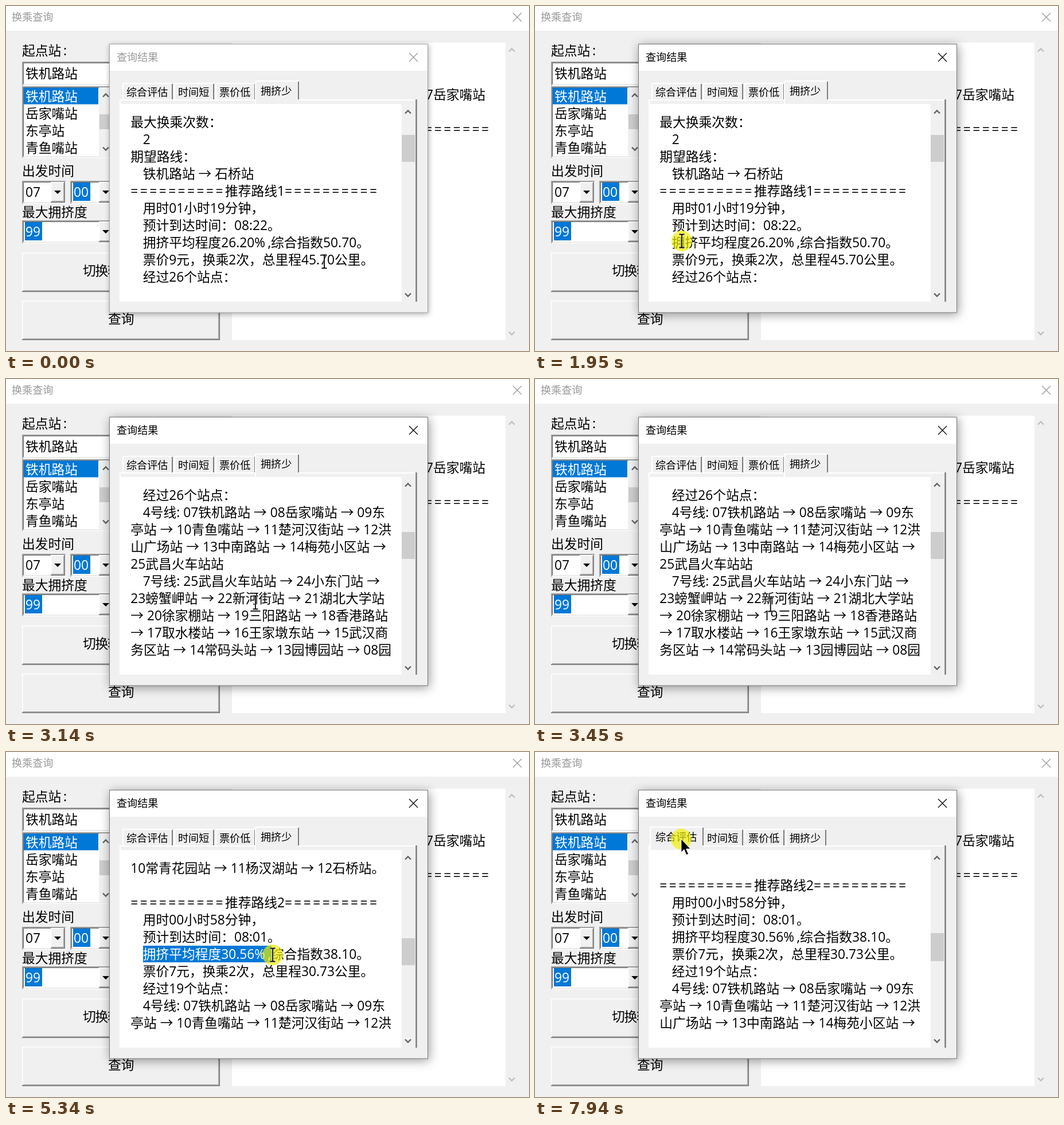
An HTML page that plays this animation: 912 px wide and 602 px high, repeating every 8000 ms.

```html
<!DOCTYPE html>
<html lang="zh-CN">
<head>
<meta charset="utf-8">
<title>换乘查询</title>
<style>
html, body { margin: 0; height: 100%; overflow: hidden; background: #f0f0f0; }
svg { display: block; width: 100vw; height: 100vh; }
text { font: 22.76px "Open Sans", "Noto Sans CJK SC", "Noto Sans CJK", sans-serif; white-space: pre; }
.small { font-size: 18.1px; }
.tight { letter-spacing: -1.2px; }
.cjk { font-family: "Noto Sans CJK SC", "Noto Sans CJK", sans-serif; }
.rule { letter-spacing: 3.45px; }
.blue { fill: #0078d7; }
.white, .white text { fill: #fff; }
.face { fill: #f0f0f0; }
.line { fill: none; stroke: currentColor; }

.title, .frame, .doc, .thumb, .tab1, .tab2, .tab4, .arrow, .beam, .halo { animation: 8s step-end infinite; }
.title { animation-name: wake; }
.frame { animation-name: shade; }
.doc { animation-name: scroll; }
.thumb { animation-name: thumb; }
.tab1 { animation-name: tab1; }
.tab2 { animation-name: tab2; }
.tab4 { animation-name: tab4; }
.arrow { animation-name: arrow; }
.beam { animation-name: beam; }
.halo { animation-name: halo; }
.cursor { animation: move 8s linear infinite; }
.pick1 { animation: pick1 8s linear infinite; }
.pick2 { animation: pick2 8s linear infinite; }

@keyframes wake { 0% { color: #999 } 22.5% { color: #000 } }
@keyframes shade {
  0% { stroke: #a2a2a2; filter: drop-shadow(1px 2px 5px #0005) }
  22.5% { stroke: #777; filter: drop-shadow(2px 3px 9px #0006) }
}
@keyframes scroll {
  0% { transform: translateY(0) }
  35% { transform: translateY(-90px) }
  37% { transform: translateY(-180px) }
  38.75% { transform: translateY(-270px) }
  46% { transform: translateY(-360px) }
  48% { transform: translateY(-450px) }
  50% { transform: translateY(-540px) }
  52.75% { transform: translateY(-630px) }
  77.1% { transform: translateY(-660px) }
}
@keyframes thumb {
  0% { transform: translateY(0); height: 47px }
  35% { transform: translateY(14px); height: 47px }
  37% { transform: translateY(28px); height: 47px }
  38.75% { transform: translateY(42px); height: 47px }
  46% { transform: translateY(57px); height: 47px }
  48% { transform: translateY(71px); height: 47px }
  50% { transform: translateY(86px); height: 47px }
  52.75% { transform: translateY(100px); height: 47px }
  77.1% { transform: translateY(91px); height: 49px }
}
@keyframes tab1 { 0% { visibility: hidden } 98.25% { visibility: visible } }
@keyframes tab2 { 0% { visibility: hidden } 77.1% { visibility: visible } 98.25% { visibility: hidden } }
@keyframes tab4 { 0% { visibility: visible } 77.1% { visibility: hidden } }
@keyframes arrow {
  0% { visibility: hidden } 73.5% { visibility: visible }
  79.5% { visibility: hidden } 95.8% { visibility: visible }
}
@keyframes beam {
  0% { visibility: visible } 73.5% { visibility: hidden }
  79.5% { visibility: visible } 95.8% { visibility: hidden }
}
@keyframes halo {
  0% { visibility: hidden } 22.5% { visibility: visible } 30.5% { visibility: hidden }
  63.5% { visibility: visible } 67.75% { visibility: hidden }
  76.8% { visibility: visible } 78.5% { visibility: hidden } 98% { visibility: visible }
}
@keyframes pick1 { 0%, 25% { width: 0 } 30%, 63.5% { width: 201px } 63.51%, 100% { width: 0 } }
@keyframes pick2 { 0%, 64% { width: 0 } 65% { width: 61px } 66.75%, 77.1% { width: 224px } 77.11%, 100% { width: 0 } }
@keyframes move {
  0%, .9% { transform: translate(555px, 446px) }
  5% { transform: translate(440px, 385px) }
  7.5% { transform: translate(322px, 358px) }
  10.9% { transform: translate(350px, 418px) }
  11.75% { transform: translate(361px, 421px) }
  16.25% { transform: translate(300px, 430px) }
  21.4% { transform: translate(277px, 411px) }
  22.5%, 24.6% { transform: translate(256px, 410px) }
  30% { transform: translate(460px, 412px) }
  32.5% { transform: translate(452px, 410px) }
  39.25% { transform: translate(435px, 390px) }
  51.75% { transform: translate(357px, 403px) }
  54% { transform: translate(392px, 399px) }
  58% { transform: translate(330px, 365px) }
  61% { transform: translate(250px, 339px) }
  63%, 64% { transform: translate(239px, 352px) }
  65% { transform: translate(300px, 353px) }
  66.75% { transform: translate(465px, 354px) }
  67.75% { transform: translate(467px, 355px) }
  71% { transform: translate(400px, 250px) }
  74.5% { transform: translate(330px, 145px) }
  77% { transform: translate(330px, 137px) }
  78.5% { transform: translate(328px, 140px) }
  80.9% { transform: translate(315px, 180px) }
  86.5% { transform: translate(322px, 225px) }
  90% { transform: translate(340px, 262px) }
  93% { transform: translate(290px, 250px) }
  95.5% { transform: translate(247px, 172px) }
  96.4% { transform: translate(251px, 156px) }
  98%, 100% { transform: translate(255px, 152px) }
}
</style>
</head>
<body>
<svg id="stage" viewBox="0 0 912 602"></svg>
<script>
const rect = (x, y, right, bottom, attrs) =>
  `<rect x="${x}" y="${y}" width="${right - x}" height="${bottom - y}" ${attrs}/>`;
const path = (d, color, width) => `<path d="${d}" class="line" style="color:${color}" stroke-width="${width}"/>`;

const markup = s => s
  .replace(/=+/g, m => `<tspan class='rule'>${m}</tspan>`)
  .replace(/→/g, "<tspan class='cjk'>→</tspan>")
  .replace('%,', "%<tspan dx='4.5'>,</tspan>");
// y is the vertical middle of the characters
const label = (x, y, s, attrs = '') => `<text x="${x}" y="${y + 8.3}" ${attrs}>${markup(s)}</text>`;
const small = (x, y, s, attrs = '') => `<text x="${x}" y="${y + 6.8}" class="small" ${attrs}>${s}</text>`;

const cross = (x, y) => `<path class="line" stroke-width="1.3" d="M${x - 7.5} ${y - 7.5}l15 15m0-15l-15 15"/>`;
const chevron = (x, y, dir, color) => path(`M${x - 5} ${y + 2.5 * dir}l5 ${-5 * dir}l5 ${5 * dir}`, color, 2.4);

const sunken = (x, y, right, bottom) =>
  rect(x, y, right, bottom, 'fill="#fff"') +
  path(`M${x + .75} ${bottom}V${y + .75}H${right}`, '#a0a0a0', 1.5) +
  path(`M${x + 2.25} ${bottom - 1.5}V${y + 2.25}H${right - 1.5}`, '#696969', 1.5) +
  path(`M${x + 1.5} ${bottom - 2}H${right - 2}V${y + 1.5}`, '#e3e3e3', 1.5);
const raised = (x, y, right, bottom) =>
  rect(x, y, right, bottom, 'class="face"') +
  path(`M${x + .75} ${bottom}V${y + .75}H${right}`, '#fff', 1.5) +
  path(`M${x} ${bottom - .75}H${right - .75}V${y}`, '#696969', 1.5) +
  path(`M${x + 1.5} ${bottom - 2.25}H${right - 2.25}V${y + 1.5}`, '#a0a0a0', 1.5);
const combo = (x, y, right, bottom, value, selected) =>
  sunken(x, y, right, bottom) +
  raised(right - 26, y + 2, right - 1, bottom - 2) +
  `<path d="M${right - 20} ${y + 17}h12l-6 6z"/>` +
  (selected ? rect(x + 5, y + 3, x + 35, y + 35, 'class="blue"') : '') +
  label(x + 6, y + 19.5, value, selected ? 'class="white"' : '');

const mainWindow = () => {
  const stations = ['铁机路站', '岳家嘴站', '东亭站', '青鱼嘴站'];
  return rect(0, 0, 912, 602, 'class="face"') + rect(0, 0, 912, 43, 'fill="#fff"') +
    small(10, 19.5, '换乘查询', 'fill="#999"') + `<g color="#999">${cross(891.5, 19.5)}</g>` +
    rect(394, 64, 871, 583, 'fill="#fff"') +
    chevron(882, 77, 1, '#bfbfbf') + chevron(882, 571, -1, '#bfbfbf') +
    label(732, 155, '7岳家嘴站') + label(681, 215, '==========') +
    label(28, 78, '起点站') + label(100, 78, ':') +
    sunken(28, 97, 240, 139) + label(34, 117.5, stations[0]) +
    sunken(28, 140, 240, 265) + rect(31, 142.5, 161, 171.5, 'class="blue"') +
    stations.map((s, i) => label(34, 158 + 30 * i, s, i ? '' : 'class="white"')).join('') +
    rect(162, 142, 186, 263, 'class="face"') + rect(163, 189, 186, 215, 'fill="#cdcdcd"') +
    chevron(174, 156, 1, '#606060') + chevron(174, 249, -1, '#606060') +
    label(28, 288, '出发时间') +
    combo(28, 305, 104, 345, '07') + combo(112, 305, 188, 345, '00', true) +
    label(28, 360, '最大拥挤度') + combo(28, 374, 188, 414, '99', true) +
    raised(28, 430, 373, 499) + label(134, 462, '切换转', 'class="tight"') +
    raised(28, 514, 373, 583) + label(178, 546, '查询');
};

const tabs = [[203, 291, '综合评估'], [293, 363, '时间短'], [365, 435, '票价低'], [437, 508, '拥挤少']];
const tab = ([x, right, name], active) => {
  const grow = active ? 3 : 0, top = active ? 130 : 134, bottom = active ? 171 : 163;
  const l = x - grow, r = right + grow;
  return rect(l, top, r, bottom, 'class="face"') +
    path(`M${l + 1} ${bottom}V${top + 2}l1 -1H${r - 2}`, '#fff', 2) +
    path(`M${r - 1} ${top + 2}V163`, '#7c7c7c', 2) +
    small(x + 7, active ? 148 : 150.5, name);
};

const line4 = [' 4号线: 07铁机路站 → 08岳家嘴站 → 09东',
  '亭站 → 10青鱼嘴站 → 11楚河汉街站 → 12洪',
  '山广场站 → 13中南路站 → 14梅苑小区站 →'];
const lines = ['最大换乘次数：', ' 2', '期望路线：', ' 铁机路站 → 石桥站',
  '==========推荐路线1==========', ' 用时01小时19分钟，', ' 预计到达时间：08:22。',
  ' 拥挤平均程度26.20%,综合指数50.70。', ' 票价9元，换乘2次，总里程45.70公里。', ' 经过26个站点：',
  ...line4, '25武昌火车站站',
  ' 7号线: 25武昌火车站站 → 24小东门站 →', '23螃蟹岬站 → 22新河街站 → 21湖北大学站',
  '→ 20徐家棚站 → 19三阳路站 → 18香港路站', '→ 17取水楼站 → 16王家墩东站 → 15武汉商',
  '务区站 → 14常码头站 → 13园博园站 → 08园', '博园北站',
  ' 6号线: 08园博园北站 → 09轻工大学站 →', '10常青花园站 → 11杨汊湖站 → 12石桥站。', '',
  '==========推荐路线2==========', ' 用时00小时58分钟，', ' 预计到达时间：08:01。',
  ' 拥挤平均程度30.56%,综合指数38.10。', ' 票价7元，换乘2次，总里程30.73公里。', ' 经过19个站点：',
  ...line4];
const row = i => label(lines[i][0] === ' ' ? 238.7 : 217.3, 203 + 30 * i, lines[i].trim());
const pick = (id, i, x) => {
  const box = rect(x, 188 + 30 * i, x, 217 + 30 * i, `class="${id} blue"`);
  return `<clipPath id="${id}">${box}</clipPath>${box}<g class="white" clip-path="url(#${id})">${row(i)}</g>`;
};

const dialog = () =>
  rect(180.5, 66.5, 735.5, 535, 'class="frame face"') + rect(181, 67, 735, 113, 'fill="#fff"') +
  `<g class="title">${small(193, 89.5, '查询结果', 'fill="currentColor"')}${cross(710.5, 89.5)}</g>` +
  path('M199 516V164H715', '#fff', 2) + path('M715.5 163V516', '#7c7c7c', 2.5) +
  tabs.map(t => tab(t)).join('') +
  [1, 2, 4].map(n => `<g class="tab${n}">${tab(tabs[n - 1], true)}</g>`).join('') +
  rect(199, 171, 690, 516, 'fill="#fff"') +
  chevron(701, 185, 1, '#606060') + chevron(701, 504, -1, '#606060') +
  rect(690, 225, 713, 272, 'class="thumb" fill="#cdcdcd"') +
  `<clipPath id="view">${rect(199, 188, 690, 488, '')}</clipPath>
  <g clip-path="url(#view)"><g class="doc">
    ${lines.map((_, i) => row(i)).join('')}${pick('pick1', 7, 262)}${pick('pick2', 26, 239)}
  </g></g>`;

const beamShape = 'M-4.5 -11.5h3.5l1 1l1 -1h3.5M0 -11V11M-4.5 11.5h3.5l1 -1l1 1h3.5';
const cursor = `<g class="cursor">
  <circle class="halo" r="18" fill="#f0f000" fill-opacity=".68"/>
  <g class="beam">${path(beamShape, '#fff', 3)}${path(beamShape, '#000', 1.8)}</g>
  <path class="arrow" d="M0 0V23L5 18L9 27.5L12.5 26L8.5 17H16Z" stroke="#fff" stroke-width=".8"/>
</g>`;

document.getElementById('stage').innerHTML = mainWindow() + dialog() + cursor;
</script>
</body>
</html>
```
